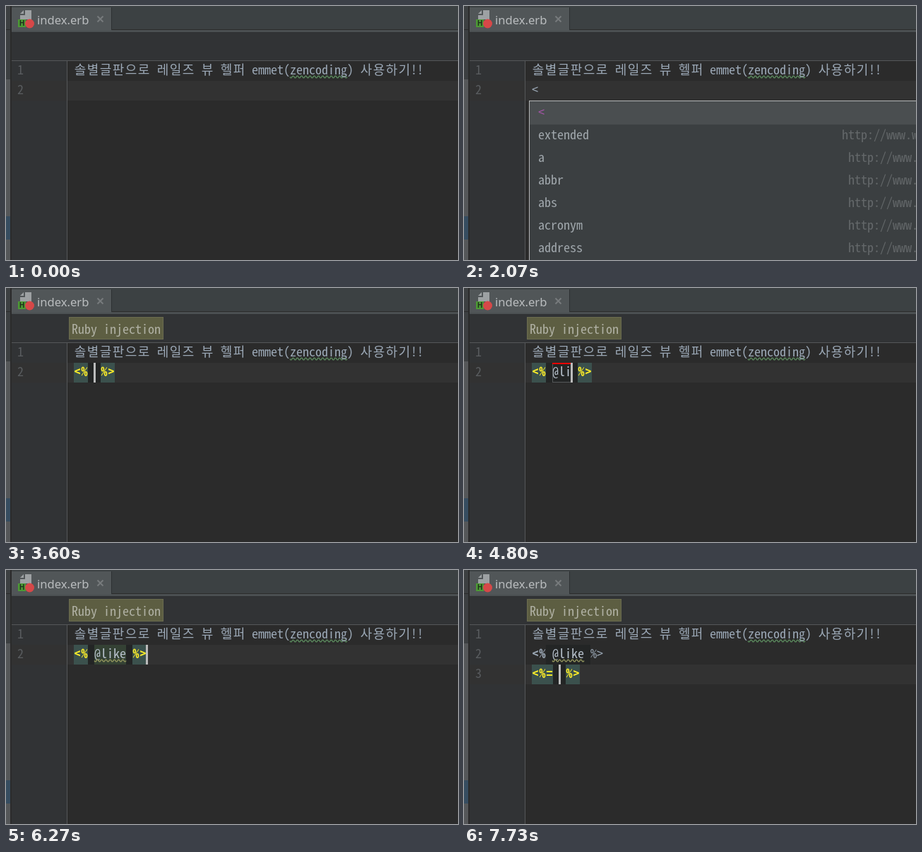
An HTML page with a canvas for the animation above (8 s loop, 640 by 360 pixels).

```html
<!DOCTYPE html>
<html lang="ko">
<head>
<meta charset="utf-8">
<title>index.erb</title>
<style>
  html, body { margin: 0; width: 100%; height: 100%; overflow: hidden; background: #2b2b2b; }
  canvas { display: block; width: 640px; height: 360px; }
</style>
</head>
<body>
<canvas id="stage" width="640" height="360"></canvas>
<script>
const ctx = document.getElementById('stage').getContext('2d');
const LOOP = 8000, LEFT = 96, CELL = 9, BOLD_CELL = 10, ROW = 28;
const LATIN = '"Noto Sans Mono CJK KR", "Liberation Mono", monospace';
const HANGUL = '"Noto Sans CJK KR Light", "Noto Sans CJK KR", "Noto Sans CJK", sans-serif';
const CODE = '#9ca9b7', BRACE = '#ffef28', BRACE_BG = '#3b514d', TEMPLATE_BG = '#232525';

// Each step changes part of the editor state.
const steps = [
  [0, { line: 2, text: '', caret: null, popup: '', crumb: false, variable: '', tag: '' }],
  [670, { caret: 96 }],
  [1400, { text: '<', caret: 105 }],
  [1470, { popup: 'tags' }],
  [2070, { caret: null }],
  [2530, { popup: '' }],
  [2600, { text: '', tag: 'active', caret: 125 }],
  [2800, { crumb: true }],
  [3130, { caret: null }],
  [3600, { caret: 125 }],
  [4070, { caret: null }],
  [4330, { variable: '@', caret: 134 }],
  [4670, { variable: '@l', caret: 143 }],
  [4800, { variable: '@li', caret: 152 }],
  [4930, { popup: 'variable' }],
  [5270, { variable: '@lik', caret: 161, popup: '' }],
  [5400, { variable: '@like', caret: 170 }],
  [6270, { tag: 'done', caret: 199 }],
  [6330, { line: 3, caret: 96 }],
  [6600, { tag: 'plain' }],
  [6730, { crumb: false }],
  [7330, { text: '<', caret: 105 }],
  [7470, { text: '<%=', caret: 135 }],
  [7730, { crumb: true }]
];

const stateAt = time => Object.assign({}, ...steps.filter(([t]) => t <= time).map(([, s]) => s));
const rowTop = line => 78 + (line - 1) * ROW;
const baseline = line => rowTop(line) + 19;

function box(x, y, w, h, color) {
  ctx.fillStyle = color;
  ctx.fillRect(x, y, w, h);
}

// Writes on a fixed grid, Hangul taking two cells; returns the end position.
function write(text, x, y, color = CODE, bold = false) {
  ctx.fillStyle = color;
  ctx.textAlign = 'center';
  for (const char of text) {
    const wide = char >= '가';
    const width = wide ? 2 * CELL : bold ? BOLD_CELL : CELL;
    ctx.font = `${bold ? 'bold' : '300'} 18px ${wide ? HANGUL : LATIN}`;
    ctx.fillText(char, x + width / 2, y);
    x += width;
  }
  return x;
}

function wave(x, y, width, color) {
  ctx.beginPath();
  for (let i = 0; i <= width; i++) {
    ctx.lineTo(x + i, y + 1.5 * Math.sin(i * Math.PI / 3));
  }
  ctx.strokeStyle = color;
  ctx.lineWidth = 1.3;
  ctx.stroke();
}

function brace(text, x, line) {
  box(x, rowTop(line), text.length * BOLD_CELL, ROW, BRACE_BG);
  return write(text, x, baseline(line), BRACE, true);
}

function drawTab() {
  box(8, 0, 632, 33, '#3c4143');
  box(8, 33, 632, 1, '#2b2b2b');
  box(8, 34, 632, 3, '#4b5052');
  box(8, 37, 632, 1, '#2e3032');
  box(8, 2, 141, 33, '#515658');
  box(149, 2, 1, 32, '#2d3032');

  ctx.fillStyle = '#9da1a3';
  ctx.fill(new Path2D('M27 6H36V19H20V13H27Z'));
  ctx.fill(new Path2D('M25 6V11H20Z'));
  box(17, 19, 11, 11, '#4c9a35');
  ctx.font = 'bold 10px "Liberation Sans", sans-serif';
  ctx.textAlign = 'center';
  ctx.fillStyle = '#1f2b1b';
  ctx.fillText('H', 22.5, 28);
  ctx.fillStyle = '#d64848';
  ctx.beginPath();
  ctx.arc(33.5, 25, 6.5, 0, 2 * Math.PI);
  ctx.fill();

  ctx.font = '16.6px "Noto Sans", "Open Sans", sans-serif';
  ctx.textAlign = 'left';
  ctx.fillStyle = '#b9bcbe';
  ctx.fillText('index.erb', 44, 25.5);
  ctx.strokeStyle = '#777b7d';
  ctx.lineWidth = 2;
  ctx.stroke(new Path2D('M129.5 14.5l8 8m0-8l-8 8'));
}

function drawFrame(state) {
  box(0, 0, 640, 360, '#2b2b2b');
  box(0, 0, 6, 104, '#3c3f41');
  box(0, 33, 6, 1, '#2b2b2b');
  box(0, 104, 6, 256, '#555759');
  box(0, 298, 6, 33, '#364d60');
  drawTab();
  box(8, 38, 632, 39, '#313335');
  box(8, 77, 632, 1, '#555759');
  box(8, 78, 78, 282, '#313335');
  box(8, rowTop(state.line), 632, ROW, '#323232');
  box(86, 78, 1, 282, '#555759');
  for (let n = 1; n <= state.line; n++) write(String(n), 16, baseline(n), '#595c5f');

  if (state.crumb) {
    box(89, 41, 134, 32, '#6b6c50');
    box(90, 42, 132, 30, '#5d5e42');
    write('Ruby injection', 93, 65, '#b0b1a4');
  }
}

function drawTag({ tag, variable }) {
  const start = LEFT + 2 * BOLD_CELL, name = start + CELL;
  const width = variable.length * CELL;
  const end = name + width + CELL;
  const top = rowTop(2), base = baseline(2);
  box(start, top, end - start, ROW, TEMPLATE_BG);
  if (tag === 'plain') {
    write('<%', LEFT, base, CODE, true);
    write('%>', end, base);
  } else {
    brace('<%', LEFT, 2);
    brace('%>', end, 2);
  }
  if (tag === 'done') box(name, top, width, ROW, '#344134');
  write(variable, name, base, '#b9c3ce');
  if (tag !== 'active') {
    wave(name, 128.5, width, '#93965d');
  } else if (variable) {
    ctx.strokeStyle = '#55585a';
    ctx.lineWidth = 1;
    ctx.strokeRect(name + .5, top + .5, width, ROW - 1);
    box(name, top, width + 1, 2, '#f00000');
  }
}

function drawCode(state) {
  let x = write('솔별글판으로 레일즈 뷰 헬퍼 emmet(', LEFT, baseline(1));
  wave(x, 100.5, 9 * CELL, '#5b8a5d');
  write('zencoding) 사용하기!!', x, baseline(1));

  if (state.tag) drawTag(state);
  if (state.text === '<%=') {
    x = brace(state.text, LEFT, state.line);
    box(x, rowTop(state.line), 2 * CELL, ROW, TEMPLATE_BG);
    brace('%>', x + 2 * CELL, state.line);
  } else {
    write(state.text, LEFT, baseline(state.line));
  }
  if (state.caret !== null) {
    box(Math.max(LEFT, state.caret - 1), rowTop(state.line), 3, ROW, '#bbbbbb');
  }
}

function popupFrame(x, height) {
  box(x, 134, 640 - x, height, '#b4b6b7');
  box(x + 1, 135, 639 - x, height - 1, '#3b3f41');
  box(x + 1, 135, 639 - x, 33, '#4a4e50');
}

function drawPopup(kind) {
  if (kind === 'tags') {
    popupFrame(92, 226);
    write('<', 105, 157, '#a355a6');
    ['extended', 'a', 'abbr', 'abs', 'acronym', 'address'].forEach((name, i) => {
      const y = 189 + 32 * i;
      write(name, 105, y, '#a0a7ac');
      write('http://www.w', i ? 544 : 535, y, '#64686a');
    });
  } else if (kind === 'variable') {
    popupFrame(121, 59);
    write('@li', 134, 157, '#a355a6');
    write('st', 161, 157, '#a0a7ac');
  }
}

function render() {
  const state = stateAt(performance.now() % LOOP);
  drawFrame(state);
  drawCode(state);
  drawPopup(state.popup);
  requestAnimationFrame(render);
}
render();
</script>
</body>
</html>
```
